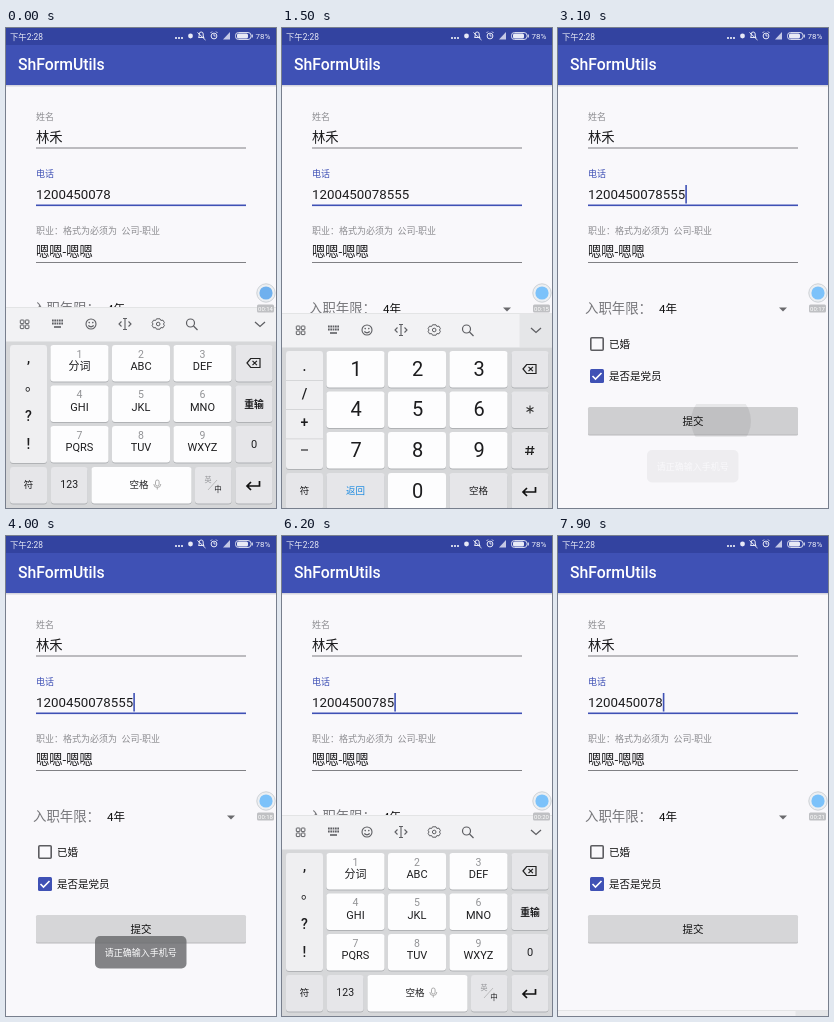
An HTML page that plays this animation: 270 by 480 pixels, repeating every 8000 ms.

```html
<!DOCTYPE html>
<html lang="zh-CN">
<head>
<meta charset="utf-8">
<title>ShFormUtils</title>
<style>
html, body { margin: 0; width: 100%; height: 100%; overflow: hidden; background: #f9f8fb; }
svg { display: block; width: 270px; height: 480px; }
text { font-family: Roboto, "Noto Sans CJK SC", "Noto Sans CJK", sans-serif; white-space: pre; }
</style>
</head>
<body>
<svg id="stage" viewBox="0 0 270 480"></svg>
<script>
const BLUE = '#3f51b5', INK = '#1c1c1e', GREY = '#8c8c90', ICON = '#5e5f63', PALE = '#e8eaf6';
const SIDE = '#e6e6e9', COLUMN = '#efeff1', KEY = '#fdfdfe', TOUCH = '#0f8ad8';
const MEDIUM = 'font-weight="500"';
const LOOP = 8000, STEP = 100;
const PHONE = '1200450078';

// y is the visual centre of the line
const text = (x, y, size, str, fill = INK, anchor = 'start', more = '') =>
  `<text x="${x}" y="${(y + size * .36).toFixed(2)}" font-size="${size}" fill="${fill}" text-anchor="${anchor}" ${more}>${str}</text>`;
const mid = (x, y, size, str, fill, more) => text(x, y, size, str, fill, 'middle', more);
const rect = (x, y, w, h, fill, r = 0, more = '') =>
  `<rect x="${x}" y="${y}" width="${w}" height="${h}" rx="${r}" fill="${fill}" ${more}/>`;
const circle = (x, y, r, fill, more = '') => `<circle cx="${x}" cy="${y}" r="${r}" fill="${fill}" ${more}/>`;
const line = (d, stroke = ICON, w = 1.1, more = '') =>
  `<path d="${d}" fill="none" stroke="${stroke}" stroke-width="${w}" ${more}/>`;
const group = (id, body, more = '') => `<g id="${id}" ${more}>${body}</g>`;
const key = (x, y, w, h, fill) => rect(x, y + 1, w, h, '#b0b2b5', 3) + rect(x, y, w, h, fill, 3);

const COLS = [44.5, 106, 167.5], ROWS = [317, 357.5, 398, 439];
const KW = 58, KH = 36.5;

function statusBar() {
  return rect(0, 57, 270, 1.5, '#d5d5de') + rect(0, 0, 270, 57, BLUE) + rect(0, 0, 270, 17, '#3343a0') +
    text(4, 8.5, 8.4, '下午2:28', PALE) +
    [170, 173, 176].map(x => circle(x, 10, 1, '#fff')).join('') +
    circle(184.5, 8, 2.4, PALE) +
    line('M192.500 9.500h5.500l-.8-1.500v-2a2 2 0 0 0-4 0v2zM191.500 4.500l8 7.500', PALE, 1) +
    circle(208, 8, 2.9, 'none', `stroke="${PALE}"`) +
    line('M208 6v2h1.600M204.500 5l1.500-1.500M211.500 5L210 3.500', PALE, .9) +
    `<path d="M217 11.500l7-7.500v7.500z" fill="${PALE}" opacity=".8"/>` +
    rect(229.5, 4.5, 15.5, 7, 'none', 3, `stroke="${PALE}" stroke-width=".9"`) +
    rect(231, 5.5, 11, 5, PALE, 1.5) + rect(245.6, 6.5, 1.2, 3, PALE) +
    text(249.5, 8.5, 8, '78%', PALE) +
    text(12, 36.5, 15.75, 'ShFormUtils', '#fff', 'start', MEDIUM);
}

function form() {
  const under = y => rect(30, y, 210, 1, '#808084');
  return text(30, 89, 9, '姓名', GREY) + text(30, 109.2, 13.3, '林禾') + under(119.5) +
    text(30, 146, 9, '电话', BLUE) + text(30, 166.5, 13.3, '', INK, 'start', 'id="phone"') +
    rect(30, 176.5, 210, 1.6, BLUE) +
    text(30, 203, 9, '职业：格式为必须为\u00a0\u00a0公司-职业', GREY) + text(30, 223.7, 13.3, '嗯嗯-嗯嗯') + under(234) +
    text(27, 280, 13.4, '入职年限：', '#77777b') + text(101, 281, 11.5, '4年', '#111') +
    '<path d="M221 279.500h8l-4 4z" fill="#6a6a6d"/>' +
    rect(32.8, 309.8, 12.4, 12.4, 'none', 1, 'stroke="#5c5c60" stroke-width="1.6"') +
    text(51, 316, 10.5, '已婚', '#111', 'start', MEDIUM) +
    rect(32, 341, 14, 14, BLUE, 1.5) + line('M34.500 348l3 3 6-6', '#fff', 1.6) +
    text(51, 348, 10.5, '是否是党员', '#111', 'start', MEDIUM) +
    rect(30, 380, 210, 27.5, '#b9b9bb', 1.5) + rect(30, 379, 210, 27.5, '#d6d6d8', 1.5) +
    group('ripple', rect(30, 379, 210, 27.5, '#000', 1.5, 'opacity=".03"') +
      circle(163, 393, 30, '#000', 'id="wave" opacity=".07" clip-path="url(#button)"')) +
    mid(135, 393, 10.5, '提交', '#111', MEDIUM);
}

function toolbar() {
  const grid = [14.3, 19.3].flatMap(x => [292, 297].map(y =>
    rect(x, y, 3.6, 3.6, 'none', .6, `stroke="${ICON}"`))).join('');
  return rect(0, 279, 270, 35, '#f2f2f4') + rect(0, 279, 270, .7, '#dddee0') +
    rect(237.5, 279.5, 32.5, 34, '#e5e6e8', 0, 'id="hide"') + grid +
    line('M46 292.500h11M46 295.500h11', ICON, 1.8, 'stroke-dasharray="1.700 .63"') + line('M48 299h7', ICON, 1.6) +
    circle(85, 296, 5, 'none', `stroke="${ICON}" stroke-width="1.1"`) +
    circle(83.2, 294.6, .8, ICON) + circle(86.8, 294.6, .8, ICON) +
    line('M82.300 297.500q2.700 2.600 5.400 0') +
    line('M117 290.500h4M119 290.500v11M117 301.500h4M115.500 293.500L113 296l2.500 2.500M122.500 293.500L125 296l-2.500 2.500') +
    line('M150.500 290.800h3.500l.8 1.600 2.200-.2 1.400 2.500-1 1.300 1 1.300-1.400 2.500-2.200-.2-.8 1.600h-3.500l-.8-1.600-2.200.2-1.400-2.500 1-1.300-1-1.300 1.400-2.500 2.200.2z', ICON, 1, 'stroke-linejoin="round"') +
    circle(152.2, 296, 1.8, 'none', `stroke="${ICON}"`) +
    circle(184.5, 295, 4, 'none', `stroke="${ICON}" stroke-width="1.2"`) + line('M187.500 298l4 4', ICON, 1.3) +
    line('M249 294l5 4.500 5-4.500', ICON, 1.3);
}

function sharedKeys() {
  return rect(0, 313.5, 270, 167, '#d6d7d9') +
    key(4, ROWS[0], 37, 118, COLUMN) + key(4, ROWS[3], 37, KH, SIDE) + mid(22.5, 456.7, 9.5, '符', INK) +
    ROWS.map(y => key(229.5, y, 37, KH, SIDE)).join('') +
    line('M241 335l3.700-4.500h9.300v9h-9.300zM246.500 332.800l4.400 4.400M250.900 332.800l-4.400 4.400', '#222', 1.2) +
    line('M253.500 453v5h-12M245 454l-4 4 4 4', '#111', 1.7);
}

const mainKeys = label => ROWS.slice(0, 3).map((y, r) => COLS.map((x, c) =>
  key(x, y, KW, KH, KEY) + label(x + KW / 2, y, r * 3 + c)).join('')).join('');

const column = marks => marks.map(([s, y]) => mid(22.5, y, 14, s, INK, MEDIUM)).join('');

function pinyinKeys() {
  const names = ['分词', 'ABC', 'DEF', 'GHI', 'JKL', 'MNO', 'PQRS', 'TUV', 'WXYZ'];
  return mainKeys((x, y, i) => mid(x, y + 8.8, 10.5, i + 1, '#929396') + mid(x, y + 21.3, 11, names[i])) +
    column([[',', 330], ['?', 388], ['!', 415.5]]) + mid(26, 357, 14, '。', INK, MEDIUM) +
    mid(248, 376, 9.8, '重输', INK, 'font-weight="700"') + mid(248, 416.5, 11, '0') +
    key(45, ROWS[3], 36.5, KH, SIDE) + mid(63.2, 456.7, 10.5, '123') +
    key(85.5, ROWS[3], 100, KH, KEY) + mid(133, 456.7, 9.5, '空格', INK, MEDIUM) +
    rect(149.5, 452, 3.6, 6, 'none', 1.8, 'stroke="#999" stroke-width=".8"') +
    line('M147.800 456a3.500 3.500 0 0 0 7 0M151.300 459.500v2', '#999', .8) +
    key(189, ROWS[3], 36.5, KH, SIDE) + mid(202, 451.5, 7, '英', '#929396') +
    mid(212, 461, 7.5, '中', INK, MEDIUM) + line('M202 462l9-10', '#aaa', .7);
}

function numberKeys() {
  return mainKeys((x, y, i) => mid(x + .7, y + 17.7, 20, i + 1)) +
    [346, 375, 404.5].map(y => rect(4, y, 37, .8, '#cfd0d2')).join('') +
    column([['.', 332], ['/', 359.5], ['+', 388]]) + line('M19 416h7', INK, 1.1) +
    line('M248 371.500v8M244.500 373.500l7 4M251.500 373.500l-7 4', '#333') +
    line('M246.500 412l-1 9M250.500 412l-1 9M243.500 414.700h9M243 418.300h9', '#222', 1.3) +
    COLS.map((x, i) => key(x, ROWS[3], KW, KH, i === 1 ? KEY : SIDE)).join('') +
    mid(73.5, 456.7, 9.5, '返回', '#1989e0', MEDIUM) + mid(135.7, 456.7, 20, '0') +
    mid(196.5, 456.7, 9.5, '空格', INK, MEDIUM);
}

const stage = document.getElementById('stage');
stage.innerHTML =
  '<clipPath id="button"><rect x="30" y="376" width="210" height="33" rx="2"/></clipPath>' +
  rect(0, 0, 270, 480, '#f9f8fb') + statusBar() + form() +
  rect(0, 157, 1.6, 18.5, BLUE, 0, 'id="caret"') +
  `<path id="handle" d="M128.400 174.500l4.700 3a7 7 0 1 1-9.400 0z" fill="${TOUCH}"/>` +
  group('keyboard', toolbar() + sharedKeys() + group('pinyin', pinyinKeys()) + group('numbers', numberKeys()) +
    rect(0, 0, 0, KH, '#000', 3, 'id="press" opacity=".13"')) +
  group('toast', rect(89, 400, 91.5, 32.5, '#66676a', 5) + mid(134.7, 416.5, 9, '请正确输入手机号', '#fff')) +
  circle(260, 265, 9.2, '#eceff2', 'stroke="#c9cdd2" stroke-width=".9"') +
  circle(260, 265, 6.6, '#7cc2fa', 'id="bubble"') +
  rect(251, 276.5, 17, 8, '#bfc0c3', 1.5) + mid(259.5, 280.6, 6, '', '#fff', 'id="timer"');

const el = Object.fromEntries([...stage.querySelectorAll('[id]')].map(e => [e.id, e]));
const show = (name, on) => el[name].setAttribute('visibility', on ? 'inherit' : 'hidden');
const set = (name, attrs) => { for (const a in attrs) el[name].setAttribute(a, attrs[a]); };

// [time, value] pairs
const slide = [[0, 0], [1400, 0], [1500, 6], [1600, 40], [1700, 102], [1800, 165], [1900, 195], [2000, 210],
  [4900, 210], [5000, 190], [5100, 100], [5200, 40], [5300, 12], [5400, 0],
  [7400, 0], [7500, 6], [7600, 40], [7700, 102], [7800, 165], [7900, 195]];
const toastFade = [[3000, 0], [3100, .07], [3200, .4], [3400, .8], [4900, .8], [5200, .22], [5400, 0]];
const toastDrop = [[3000, 34], [3100, 22], [3200, 8], [3300, 2], [3400, 0]];
const wave = [[2800, 10], [3100, 30], [3400, 60]];
const typed = [[0, 0], [500, 1], [700, 2], [900, 3], [5800, 2], [6200, 1], [6500, 0]];
const caretFlips = [300, 1400, 1900, 2400, 2900, 3400, 3900, 4400, 4900, 5400, 5700, 7000, 7500];
// start, end, x, row, width
const presses = [[100, 200, 45, 3, 36.5], ...[500, 700, 900].map(t => [t, t + 100, COLS[1], 1, KW]),
  ...[[5700, 5900], [6000, 6200], [6400, 6600]].map(p => [...p, 229.5, 0, 37])];

const held = (table, t) => table.filter(p => p[0] <= t).pop()[1];
function lerp(table, t) {
  const i = table.findIndex(p => p[0] > t);
  if (i < 0) return table[table.length - 1][1];
  if (!i) return table[0][1];
  const [t0, a] = table[i - 1], [t1, b] = table[i];
  return a + (b - a) * (t - t0) / (t1 - t0);
}
const between = (t, a, b) => t >= a && t < b;

function draw(t) {
  const extra = held(typed, t);
  const grabbed = between(t, 5000, 5800);
  el.phone.textContent = PHONE + '5'.repeat(extra);
  set('caret', { x: 29.8 + 7.5 * (PHONE.length + extra), fill: grabbed ? TOUCH : BLUE });
  show('caret', caretFlips.filter(f => f <= t).length % 2);
  show('handle', grabbed);

  set('keyboard', { transform: `translate(0 ${lerp(slide, t)})` });
  const digits = between(t, 200, 4000);
  show('numbers', digits);
  show('pinyin', !digits);
  show('hide', between(t, 1300, 2000) || t >= 7400);

  const p = presses.find(q => between(t, q[0], q[1]));
  show('press', p);
  if (p) set('press', { x: p[2], y: ROWS[p[3]], width: p[4] });

  show('ripple', between(t, 2800, 3500));
  set('wave', { r: lerp(wave, t) });
  set('toast', { opacity: lerp(toastFade, t), transform: `translate(0 ${lerp(toastDrop, t)})` });

  set('bubble', { fill: t < 200 || between(t, 7100, 7500) ? '#6fb0ee' : '#7cc2fa' });
  el.timer.textContent = '00:' + (14 + Math.floor(t / 1000));
}

const start = performance.now();
function tick() {
  const t = (performance.now() - start) % LOOP;
  draw(Math.floor(t / STEP) * STEP);
  requestAnimationFrame(tick);
}
tick();
</script>
</body>
</html>
```
